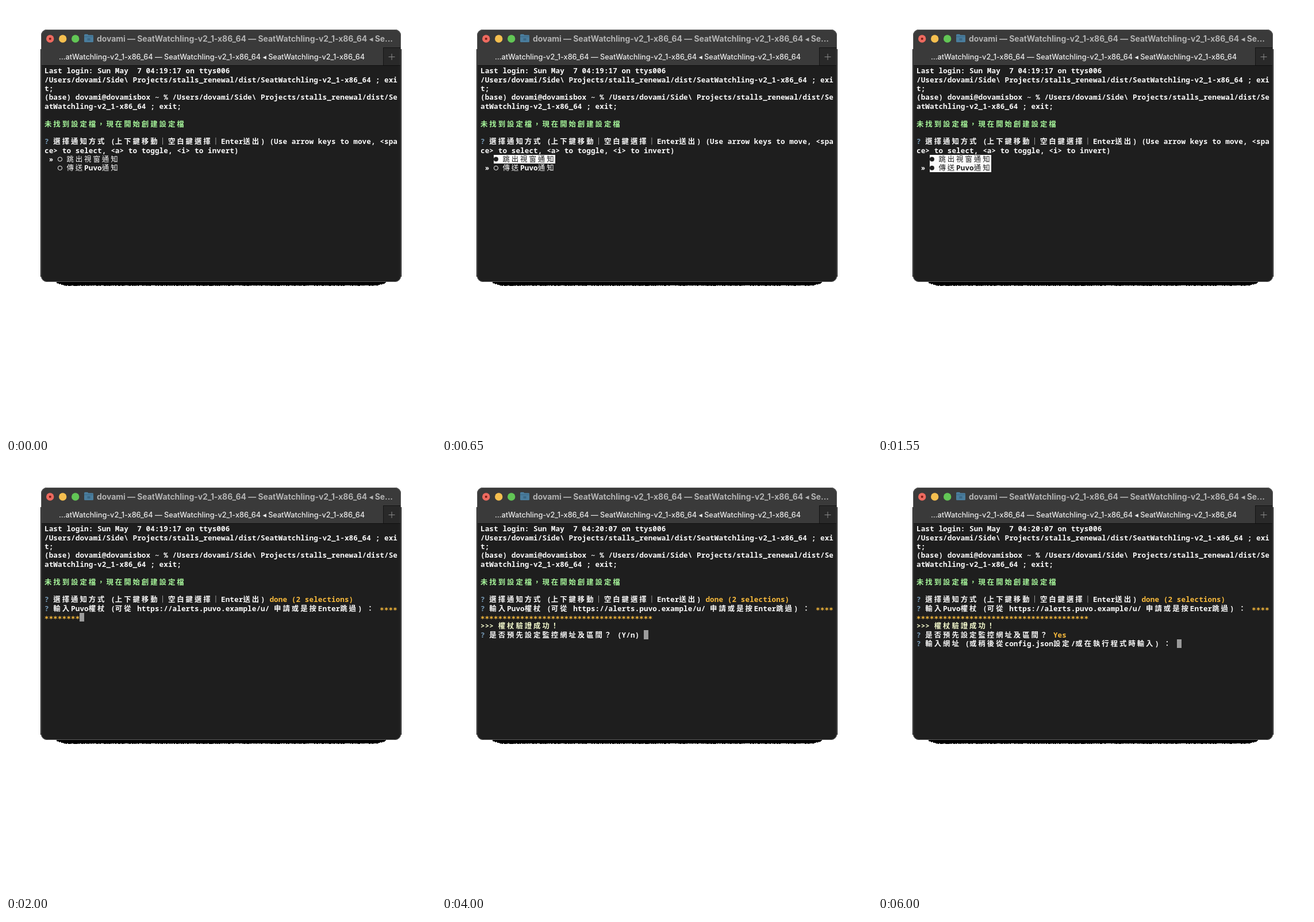
These frames come from a looping animation (748x748 px, 8 s). An HTML page with a canvas:

```html
<!DOCTYPE html>
<html lang="zh-Hant">
<head>
<meta charset="utf-8">
<style>
  html, body { margin: 0; width: 100%; height: 100%; overflow: hidden; background: #fff; }
  canvas { display: block; }
</style>
</head>
<body>
<canvas id="stage" width="748" height="748"></canvas>
<script>
const ctx = document.getElementById('stage').getContext('2d');

const LOOP = 8000;
const COLS = 80, LEFT = 67, TOP = 105.2, CELL_W = 7.675, CELL_H = 15.35;
const REGULAR = 600, BOLD = 800;
const MONO = '"Noto Sans Mono", "DejaVu Sans Mono", monospace';
const CJK = '"Noto Sans CJK TC", "Noto Sans CJK SC", "Noto Sans CJK JP", "Noto Sans CJK", sans-serif';
const SANS = 'Inter, "DejaVu Sans", sans-serif';

const BG = '#1e1e1e', WHITE = '#fafafa', BLUE = '#7699b5', GOLD = '#f8ba3c';
const GREEN = '#a6f59a', CREAM = '#f3f9cc', GREY = '#9b9b9b';

const USER = 'dovami';
const APP = 'SeatWatchling-v2_1-x86_64';
const SERVICE = 'Puvo';
const MASK = '∗';
const PATH = `/Users/${USER}/Side\\ Projects/stalls_renewal/dist/${APP} ; exit;`;

function rect(x, y, w, h, color) {
  ctx.fillStyle = color;
  ctx.fillRect(x, y, w, h);
}

function disc(x, y, r, color) {
  ctx.fillStyle = color;
  ctx.beginPath();
  ctx.arc(x, y, r, 0, Math.PI * 2);
  ctx.fill();
}

function box(x, y, w, h, r) {
  ctx.beginPath();
  ctx.roundRect(x, y, w, h, r);
}

function label(text, x, y, font, color) {
  ctx.font = `${font} ${SANS}`;
  ctx.fillStyle = color;
  ctx.textAlign = 'center';
  ctx.fillText(text, x, y);
}

function drawShadow() {
  rect(60, 75, 628, 396, '#000');
  let seed = 7;
  for (let x = 88; x < 661; x++) {
    seed = seed * 16807 % 2147483647;
    const edge = Math.min(x - 87, 661 - x);
    const depth = Math.min(6, 1 + edge / 3) + seed % 2;
    ctx.fillRect(x, 480, 1, Math.round(depth));
  }
}

function drawWindow() {
  rect(0, 0, 748, 748, '#fff');
  drawShadow();

  ctx.save();
  box(61, 41, 626, 439, 10);
  ctx.clip();
  rect(61, 41, 626, 439, BG);
  rect(61, 41, 626, 62, '#3a3a3a');
  rect(656, 72, 31, 31, '#292929');
  rect(656, 72, 31, 1, '#151515');
  rect(656, 72, 1, 31, '#151515');
  rect(61, 103, 626, 1, '#101010');
  ctx.restore();

  ctx.strokeStyle = '#5c5c5c';
  box(61.5, 41.5, 625, 438, 10);
  ctx.stroke();

  ['#ed6a5f', '#f5bf4f', '#62c655'].forEach((color, i) => disc(76.7 + i * 22, 57, 6.7, color));
  disc(76.7, 57, 2, '#7c1a14');

  // Folder
  ctx.fillStyle = '#4a7d9d';
  box(136, 49, 7, 5, 1.5);
  ctx.fill();
  box(136, 50.5, 16, 12.5, 1.5);
  ctx.fill();
  rect(136, 53, 16, 1, '#3a6886');
  rect(141.5, 56, 5, 4, '#3a6886');

  label(`${USER} — ${APP} — ${APP} ◂ Se...`, 415.5, 62, '700 13.9px', '#b3b3b3');
  label(`…${APP.slice(2)} — ${APP} ◂ ${APP}`, 358, 92.7, '500 12.7px', '#ececec');
  rect(665.5, 88, 11, 1, '#8b8b8b');
  rect(670.5, 83, 1, 11, '#8b8b8b');
}

let col, row;

function write(text, color = WHITE, weight = REGULAR, back = null) {
  for (const ch of text) {
    if (ch === '\n') { col = 0; row++; continue; }
    const wide = /[\u2e80-\uffef]/.test(ch);
    const span = wide ? 2 : 1;
    if (col + span > COLS) { col = 0; row++; }
    const x = LEFT + col * CELL_W, y = TOP + row * CELL_H;
    if (back) {
      const x0 = Math.round(x), y0 = Math.round(y);
      rect(x0, y0, Math.round(x + span * CELL_W) - x0, Math.round(y + CELL_H) - y0, back);
    }
    drawGlyph(ch, x, y, wide, color, weight);
    col += span;
  }
}

function drawGlyph(ch, x, y, wide, color, weight) {
  if (ch === ' ') return;
  if (ch === '●') return disc(x + 3.9, y + 7.8, 4, color);
  if (ch === '○') {
    ctx.strokeStyle = color;
    ctx.beginPath();
    ctx.arc(x + 3.9, y + 7.8, 3.6, 0, Math.PI * 2);
    ctx.stroke();
    return;
  }
  ctx.font = wide ? `${weight - 100} 12.4px ${CJK}` : `${weight} 12.6px ${MONO}`;
  ctx.fillStyle = color;
  ctx.textAlign = 'left';
  ctx.fillText(ch, x, y + 12.2);
}

const bold = (text, color) => write(text, color, BOLD);
const cursor = () => write(' ', WHITE, REGULAR, GREY);

function ask(text) {
  write('? ', BLUE);
  bold(text);
}

function option(text, selected, pointed) {
  bold(pointed ? ' » ' : '   ');
  if (selected) write('● ' + text, BG, REGULAR, WHITE);
  else write('○ ' + text);
  write('\n');
}

function drawMenu(t) {
  write(' (Use arrow keys to move, <space> to select, <a> to toggle, <i> to invert)\n');
  const first = t >= 650 && t < 1100 || t >= 1550;
  option('跳出視窗通知', first, t < 650);
  option(`傳送${SERVICE}通知`, t >= 1100, t >= 650);
}

function drawAnswers(t) {
  bold(' done (2 selections)\n', GOLD);
  ask(`輸入${SERVICE}權杖 (可從 https://alerts.puvo.example/u/ 申請或是按Enter跳過) ： `);
  bold(MASK.repeat(t < 3000 ? 12 : 43), GOLD);
  if (t < 4000) return cursor();

  bold('\n>>> 權杖驗證成功！\n', CREAM);
  ask('是否預先設定監控網址及區間？ ');
  if (t < 6000) {
    write('(Y/n) ');
    return cursor();
  }
  bold('Yes\n', GOLD);
  ask('輸入網址 (或稍後從config.json設定/或在執行程式時輸入) ： ');
  cursor();
}

function drawTerminal(t) {
  col = row = 0;
  write(`Last login: Sun May  7 ${t < 3000 ? '04:19:17' : '04:20:07'} on ttys006\n`);
  write(`${PATH}\n(base) ${USER}@${USER}sbox ~ % ${PATH}\n\n`);
  bold('未找到設定檔，現在開始創建設定檔\n\n', GREEN);
  ask('選擇通知方式 (上下鍵移動｜空白鍵選擇｜Enter送出)');
  if (t < 2000) drawMenu(t);
  else drawAnswers(t);
}

const start = performance.now();

function frame() {
  drawWindow();
  drawTerminal((performance.now() - start) % LOOP);
  requestAnimationFrame(frame);
}
frame();
</script>
</body>
</html>
```
